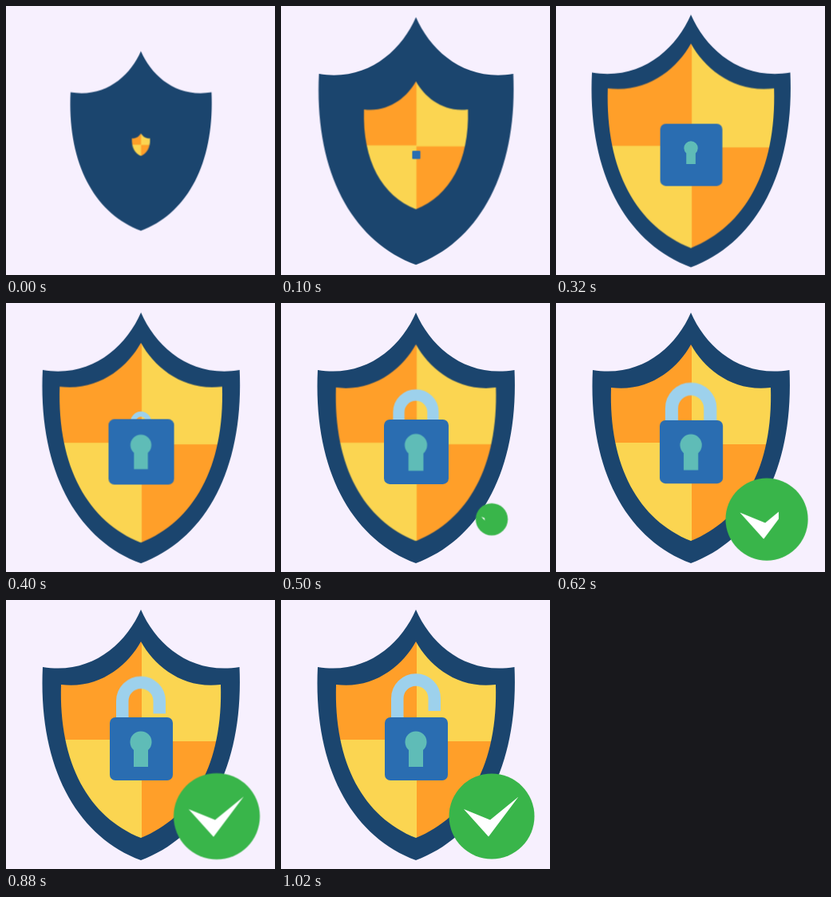
Write an HTML page that moves like this. It is 337x337 px and loops after 1040 ms.

```html
<!DOCTYPE html>
<html lang="en">
<head>
<meta charset="utf-8">
<title>Security shield</title>
<style>
  html, body {
    margin: 0;
    width: 100%;
    height: 100%;
    overflow: hidden;
    background: #f7f0fe;
  }
  svg { display: block; width: 100vw; height: 100vh; }

  .move {
    animation: 1040ms linear infinite;
    transform-box: view-box;
  }
  .outer   { animation-name: outer;   transform-origin: 169px 169px; }
  .inner   { animation-name: inner;   transform-origin: 169px 173.5px; }
  .body    { animation-name: body;    transform-origin: 169.5px 186.5px; }
  .keyhole { animation-name: keyhole; transform-origin: 169px 178px; }
  .hoop    { animation-name: hoop;    transform-origin: 169px 148px; }
  .lift    { animation-name: lift; }
  .badge   { animation-name: badge;   transform-origin: 264px 271px; }
  .tick    { animation-name: tick; }

  @keyframes outer {
    0%     { transform: scale(.713); }
    3.85%  { transform: scale(.85); }
    6.73%  { transform: scale(.935); }
    9.62%  { transform: scale(.987); }
    13.46% { transform: scale(1.022); }
    17.31% { transform: scale(1.033); }
    23.08% { transform: scale(1.024); }
    30.77% { transform: scale(1.008); }
    38.46% { transform: scale(1.001); }
    48.08%, 100% { transform: scale(1); }
  }
  @keyframes inner {
    0%     { transform: scale(.11); }
    4.81%  { transform: scale(.37); }
    9.62%  { transform: scale(.647); }
    13.46% { transform: scale(.835); }
    17.31% { transform: scale(.968); }
    21.15% { transform: scale(1.024); }
    25.96% { transform: scale(1.046); }
    30.77% { transform: scale(1.042); }
    38.46% { transform: scale(1.018); }
    48.08% { transform: scale(1.002); }
    54%, 100% { transform: scale(1); }
  }
  @keyframes body {
    0%, 6.73% { transform: scale(0); }
    9.62%  { transform: scale(.125); }
    17.31% { transform: scale(.45); }
    22.12% { transform: scale(.7); }
    26.44% { transform: scale(.88); }
    30.77% { transform: scale(.985); }
    36.54% { transform: scale(1.037); }
    41.35% { transform: scale(1.042); }
    48.08% { transform: scale(1.025); }
    57.69% { transform: scale(1.003); }
    63%, 100% { transform: scale(1); }
  }
  @keyframes keyhole {
    0%, 18.27% { transform: scale(0); }
    25%    { transform: scale(.31); }
    30.77% { transform: scale(.64); }
    35%    { transform: scale(.85); }
    38.46% { transform: scale(.97); }
    42.31% { transform: scale(1.027); }
    48.08% { transform: scale(1.04); }
    55.77% { transform: scale(1.02); }
    66%, 100% { transform: scale(1); }
  }
  @keyframes hoop {
    0%, 30.77% { transform: scale(0); }
    36.54% { transform: scale(.3); }
    42.31% { transform: scale(.65); }
    48.08% { transform: scale(.92); }
    53.85% { transform: scale(1.03); }
    59.62% { transform: scale(1.04); }
    67.31% { transform: scale(1.015); }
    75%, 100% { transform: scale(1); }
  }
  @keyframes lift {
    0%, 52% { transform: translateY(11.5px); }
    98.08%, 100% { transform: translateY(0); }
  }
  @keyframes badge {
    0%, 41.35% { transform: scale(0); }
    44.23% { transform: scale(.13); }
    48.08% { transform: scale(.37); }
    51.92% { transform: scale(.64); }
    53.85% { transform: scale(.75); }
    57.69% { transform: scale(.92); }
    61.54% { transform: scale(1.005); }
    66.35% { transform: scale(1.043); }
    71.15% { transform: scale(1.047); }
    75%    { transform: scale(1.037); }
    80.77% { transform: scale(1.017); }
    88.46% { transform: scale(1.003); }
    98.08%, 100% { transform: scale(1); }
  }
  @keyframes tick {
    0%, 45.2% { clip-path: inset(0 100% 0 0); }
    48.08% { clip-path: inset(0 84% 0 0); }
    65%, 100% { clip-path: inset(0 0 0 0); }
  }
</style>
</head>
<body>
<svg viewBox="0 0 337 337">
  <defs>
    <clipPath id="panel">
      <path d="M169 52C152 83 116 112 69 106C66 205 104 272 169 298C234 272 272 205 269 106C222 112 186 83 169 52Z"/>
    </clipPath>
  </defs>

  <path class="move outer" fill="#1b456e"
    d="M169 12C150 56 106 94 46 84C40 208 88 296 169 326C250 296 298 208 292.500 84C232 94 188 56 169 12Z"/>

  <g class="move inner">
    <g clip-path="url(#panel)">
      <rect x="60" y="45" width="220" height="260" fill="#fbd551"/>
      <path fill="#ff9f29" d="M60 45H170V175H60ZM170 177H280V305H170Z"/>
    </g>
  </g>

  <g class="move lift">
    <path class="move hoop" fill="none" stroke="#9dd1ec" stroke-width="15.5"
      d="M145.750 160V123.250a23.250 23.250 0 0 1 46.500 0V139"/>
  </g>
  <rect class="move body" x="130" y="147" width="79" height="79" rx="7" fill="#2a6db1"/>
  <path class="move keyhole" fill="#5fbcb7"
    d="M160 209V188A13.500 13.500 0 1 1 178 188V209Z"/>

  <g class="move badge">
    <circle cx="264" cy="271" r="53.5" fill="#39b54a"/>
    <path class="move tick" fill="#fff" d="M229 262L262 275.500L297.500 246.500L260 296.500Z"/>
  </g>
</svg>
</body>
</html>
```
